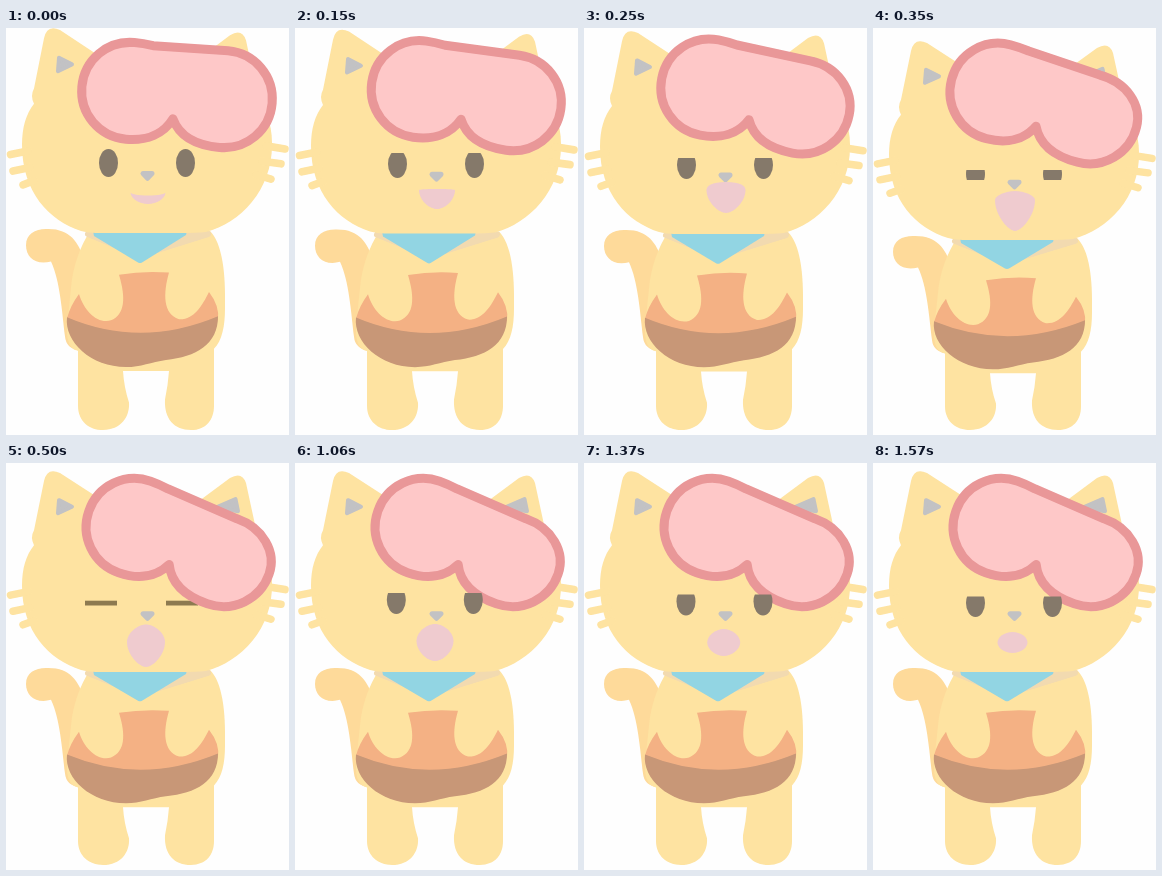
These frames come from a looping animation (283x407 px, 1.97 s). An HTML page with a canvas:

```html
<!DOCTYPE html>
<html lang="en">
<head>
<meta charset="utf-8">
<title>Sleepy cat</title>
<style>
html, body { margin: 0; width: 100%; height: 100%; overflow: hidden; background: #fefefe; }
canvas { display: block; width: 283px; height: 407px; }
</style>
</head>
<body>
<canvas id="stage"></canvas>
<script>
const W = 283, H = 407, LOOP = 1970, FLOOR = 402;
const canvas = document.getElementById('stage');
const ctx = canvas.getContext('2d');
const dpr = window.devicePixelRatio || 1;
canvas.width = W * dpr;
canvas.height = H * dpr;

const color = {
  fur: '#fee3a1', tail: '#feda9a', grey: '#c2c2c4', eye: '#85796a', lash: '#8d7a50',
  mouth: '#efcbcf', frame: '#e99798', lens: '#fec8c8', scarf: '#92d5e3',
  strap: '#f2dab0', orange: '#f4b184', brown: '#c89777'
};

const shape = {
  tail: 'M20 220C20 209 29 204 40 204C64 203 72 217 78 233L74 324Q60 322 59 310C56 285 54 255 45 236C30 240 20 232 20 220Z',
  body: 'M84 206C74 222 67 240 65 262L61 300Q60 322 72 324L72 378C72 393 83 402 97 402C115 402 124 389 123 375Q118 360 117 344L163 344Q162 358 159 372C158 391 168 402 185 402C200 402 208 392 208 378L208 322C216 314 219 300 219 282C220 246 216 218 204 206Z',
  orange: 'M73 268C78 285 92 298 105 294C119 288 120 272 113 249Q138 245 163 247C157 268 157 288 173 293C187 294 196 280 203 266Q214 280 212 294L140 318L80 306L61 292Q64 280 73 268Z',
  brown: 'M61 291Q135 322 212 290C212 318 190 330 160 333C145 335 135 340 120 340C85 340 58 315 61 291Z',
  strap: 'M82 209L202 209L134 230Z',
  scarf: 'M87 206L181 206L180 210L136 237Q134 238 132 237L88 211Z',
  head: 'M16 122C16 105 20 92 28 82Q24 74 28 67L38 18Q41 4 54 10L88 32Q140 46 194 37L224 15Q236 8 240 20L250 66C258 84 266 100 266 120C267 165 235 198 200 207Q190 208 180 208L90 208Q82 208 75 206C43 196 16 168 16 122Z',
  whiskers: 'M22 128L4.500 131.500M24 144L7 147.500M28 157L17 161M260 123L279 126M256 138L275 140.500M250 151L265 155.500',
  ears: 'M53 37L66 43.500L52 50ZM229.500 36L232 48L211 44Z',
  nose: 'M137 150L146 150L141.500 154.500Z'
};
for (const key in shape) shape[key] = new Path2D(shape[key]);

// head: ear and chin heights; goggles: x, y, degrees, droop of the right top edge;
// eyes: left x, right x, centre y, lid y, lower lid y;
// mouth: x, half width, top, middle, bottom, roundness above and below
const sleepy = { head: [8, 209], goggles: [173, 79.5, 19.3, 7] };
const poses = [
  { at: 0, head: [0, 205], goggles: [171, 67, 5, 0],
    eyes: [102.5, 179.5, 135, 110], mouth: [142, 17.5, 167.5, 164.5, 176, 0.6, 0.5] },
  { at: 150, head: [1.5, 205.5], goggles: [171.3, 67.7, 8, 1],
    eyes: [102.5, 179.5, 136, 125], mouth: [142, 18, 161, 162, 181, 0.65, 0.48] },
  { at: 250, head: [3, 206], goggles: [171.5, 68.5, 11, 3],
    eyes: [102.5, 179.5, 137, 130], mouth: [142, 19.5, 154, 162, 185, 0.75, 0.4] },
  { at: 350, head: [13, 212], goggles: [171, 75.5, 14.5, 7],
    eyes: [102.5, 179.5, 146, 142, 152], mouth: [142, 20, 163, 172, 203, 0.45, 0.33] },
  { at: 500, ...sleepy, mouth: [140, 19, 161.5, 179, 204, 0.45, 0.38] },
  { at: 1060, ...sleepy, eyes: [101.3, 178.3, 137, 130], mouth: [140, 18.5, 161, 178, 198, 0.48, 0.45] },
  { at: 1370, ...sleepy, eyes: [102, 179, 138.5, 131.5], mouth: [139.7, 16.5, 166, 179.5, 193, 0.5, 0.5] },
  { at: 1570, ...sleepy, eyes: [102.5, 179.5, 140, 133.5], mouth: [139.5, 15, 169, 179.5, 190, 0.55, 0.55] }
];

function fill(path, c) {
  ctx.fillStyle = c;
  ctx.fill(path);
}

function stroke(path, c, width) {
  ctx.strokeStyle = c;
  ctx.lineWidth = width;
  ctx.stroke(path);
}

function soft(path, c, width) {
  fill(path, c);
  stroke(path, c, width);
}

// Draws with y mapped to y * scale + shift
function stretched(scale, shift, draw) {
  ctx.save();
  ctx.transform(1, 0, 0, scale, 0, shift);
  draw();
  ctx.restore();
}

function drawBody() {
  fill(shape.tail, color.tail);
  fill(shape.body, color.fur);
  fill(shape.orange, color.orange);
  fill(shape.brown, color.brown);
  soft(shape.strap, color.strap, 6);
  fill(shape.scarf, color.scarf);
}

function drawHead() {
  fill(shape.head, color.fur);
  stroke(shape.whiskers, color.fur, 7.5);
  soft(shape.ears, color.grey, 4);
  soft(shape.nose, color.grey, 5);
}

function drawMouth([x, w, top, mid, bottom, above, below]) {
  const path = new Path2D();
  path.moveTo(x, top);
  for (const [side, end, round] of [[1, bottom, below], [-1, top, above]]) {
    const start = side > 0 ? top : bottom;
    const first = side > 0 ? above : below;
    path.bezierCurveTo(x + side * w * first, start, x + side * w, mid + (start - mid) * 0.5, x + side * w, mid);
    path.bezierCurveTo(x + side * w, mid + (end - mid) * 0.5, x + side * w * round, end, x, end);
  }
  fill(path, color.mouth);
}

function drawGoggles([x, y, angle, droop]) {
  const top = droop - 48.5;
  const path = new Path2D(`M-47-48.5C-40-48.5 -35-48 -28-47L47 ${top}
    C74 ${top} 95.5 ${-27 + droop / 2} 95.5 0C95.5 27 74 48.5 47 48.5C21 48.5 5 39 -2 24
    C-10 40 -26 48.5 -47 48.5C-74 48.5 -95.5 27 -95.5 0C-95.5-27 -74-48.5 -47-48.5Z`);
  ctx.save();
  ctx.translate(x, y);
  ctx.rotate(angle * Math.PI / 180);
  fill(path, color.lens);
  stroke(path, color.frame, 9);
  ctx.restore();
}

function drawLashes() {
  ctx.fillStyle = color.lash;
  for (const x of [79, 160]) ctx.fillRect(x, 137.7, 32, 4.8);
}

function drawEyes([left, right, y, lid, lower = H]) {
  ctx.save();
  ctx.beginPath();
  ctx.rect(0, lid, W, lower - lid);
  ctx.clip();
  ctx.fillStyle = color.eye;
  for (const x of [left, right]) {
    ctx.beginPath();
    ctx.ellipse(x, y, 9.5, 14, 0, 0, Math.PI * 2);
    ctx.fill();
  }
  ctx.restore();
}

function draw(time) {
  const pose = poses.findLast(p => p.at <= time);
  const [ear, chin] = pose.head;
  const bodyScale = (FLOOR - chin) / (FLOOR - 208);
  const headScale = (chin - ear) / 200;

  ctx.setTransform(dpr, 0, 0, dpr, 0, 0);
  ctx.lineJoin = ctx.lineCap = 'round';
  ctx.fillStyle = '#fefefe';
  ctx.fillRect(0, 0, W, H);
  stretched(bodyScale, FLOOR * (1 - bodyScale), drawBody);
  stretched(headScale, ear - 8 * headScale, drawHead);
  drawMouth(pose.mouth);
  if (!pose.eyes) drawLashes();
  drawGoggles(pose.goggles);
  if (pose.eyes) drawEyes(pose.eyes);
}

const begin = performance.now();
function tick() {
  draw((performance.now() - begin) % LOOP);
  requestAnimationFrame(tick);
}
tick();
</script>
</body>
</html>
```
